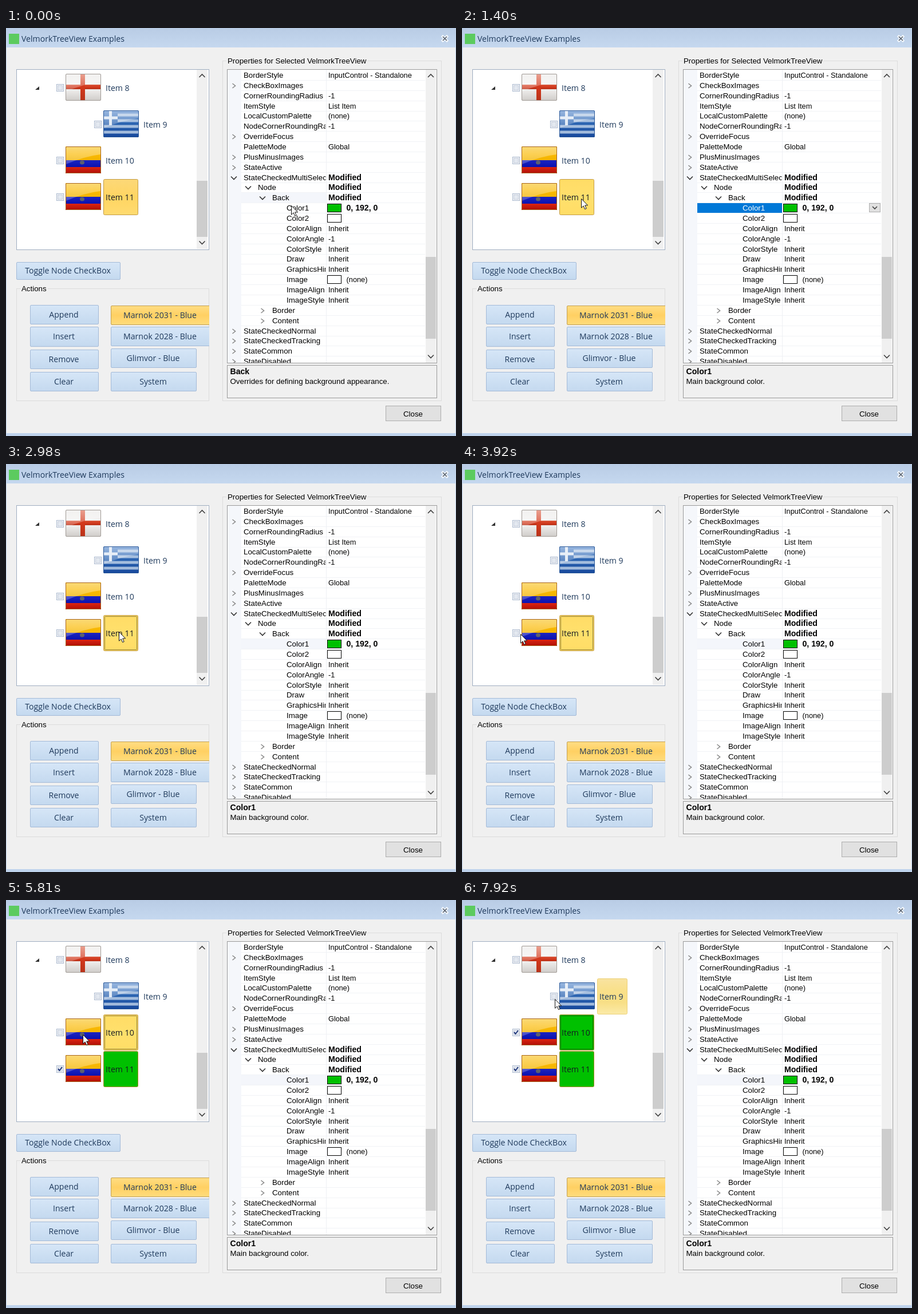
Write an HTML page that moves like this. It is 786x713 px and loops after 7.99 s.

```html
<!DOCTYPE html>
<html lang="en">
<head>
<meta charset="utf-8">
<title>Tree view examples</title>
<style>
html, body { margin: 0; width: 100%; height: 100%; overflow: hidden; background: #f0f0f0; }
svg { display: block; width: 786px; height: 713px; }
text { font-family: "Liberation Sans", Arial, sans-serif; font-size: 13.3px; fill: #000; }
.ui { font-family: "Open Sans", "Noto Sans", sans-serif; font-size: 14.1px; fill: #1e395b; }
.val { font-size: 12.8px; }
.bold { font-size: 14.1px; font-weight: bold; }
</style>
</head>
<body>
<svg id="stage" viewBox="0 0 786 713" xmlns="http://www.w3.org/2000/svg"></svg>
<script>
const LOOP = 7990;
const stage = document.getElementById('stage');

const rect = (x, y, w, h, fill, stroke = 'none', more = '') =>
  `<rect x="${x}" y="${y}" width="${w}" height="${h}" fill="${fill}" stroke="${stroke}" ${more}/>`;
const box = (x, y, w, h, fill, stroke, more) => rect(x + .5, y + .5, w - 1, h - 1, fill, stroke, more);
const text = (x, y, str, more = '') => `<text x="${x}" y="${y}" ${more}>${str}</text>`;
const line = (d, stroke, width = 1, more = '') =>
  `<path d="${d}" fill="none" stroke="${stroke}" stroke-width="${width}" ${more}/>`;
const grad = (id, ...colors) => `<linearGradient id="${id}" x2="0" y2="1">` +
  colors.map((c, i) => `<stop offset="${i / (colors.length - 1)}" stop-color="${c}"/>`).join('') +
  '</linearGradient>';
const clip = (id, x, y, w, h) => `<clipPath id="${id}">${rect(x, y, w, h, '#000')}</clipPath>`;

const chevron = (x, y, dir, color = '#404040', s = 5) => {
  const h = s * .5;
  const d = {
    right: `M${x - h} ${y - s + 1}L${x + h} ${y}L${x - h} ${y + s - 1}`,
    down: `M${x - s} ${y - h}L${x} ${y + h}L${x + s} ${y - h}`,
    up: `M${x - s} ${y + h}L${x} ${y - h}L${x + s} ${y + h}`
  }[dir];
  return line(d, color, 1.6);
};

const defs = `<defs>
  ${grad('bar', '#b9cce5', '#c5d8ef')}
  ${grad('btn', '#d6e6f7', '#c4d9ef')}
  ${grad('gold', '#ffdd83', '#ffd063', '#ffdc7c')}
  ${grad('sel', '#fcd878', '#ffd562', '#ffdb70')}
  ${grad('hot', '#ffdc66', '#ffe06c', '#ffdd66')}
  ${grad('hover', '#f9e3a0', '#f9e08a', '#f8df86', '#fbeaa8')}
  ${grad('cloth', '#e9e7e5', '#f6f5f4', '#cfccc9')}
  ${grad('cross', '#d9583c', '#d3381c', '#b8331a')}
  ${grad('sea', '#4a80c8', '#2a63b0', '#17489c')}
  ${grad('yellow', '#f6bd10', '#fbb900', '#f2b400')}
  ${grad('blue', '#1c24c0', '#0a12b0')}
  ${grad('red', '#dc2412', '#ae0f04')}
  ${grad('gloss', 'rgba(255,255,255,.42)', 'rgba(255,255,255,.2)')}
  ${clip('names', 387, 73, 171.5, 512)}
  ${clip('grid', 387, 73, 346, 512)}
  ${clip('group', 18, 455, 337, 196)}
</defs>`;

function groupBox(x, y, w, h, label, labelW) {
  return box(x, y, w, h, 'none', '#dcdcdc') + rect(x + 7, y - 3, labelW, 8, '#f0f0f0') +
    text(x + 9, y + 5, label);
}

function button(x, y, w, h, label, fill = 'btn', edge = '#a3bad8') {
  return box(x, y, w, h, `url(#${fill})`, edge, 'rx="1.5"') +
    text(x + w / 2 - 1, y + h / 2 + 4.5, label, 'class="ui" text-anchor="middle"');
}

function scrollBar(x, y, w, h, thumbY, thumbH) {
  const mid = x + w / 2;
  return rect(x, y, w, h, '#f0f0f0') + rect(x, thumbY, w, thumbH, '#cdcdcd') +
    chevron(mid, y + 10.5, 'up') + chevron(mid, y + h - 11, 'down');
}

// Flags are drawn in a 62 x 47 cell.
const sheen = '<path d="M1 1H61V14Q34 17 1 31Z" fill="url(#gloss)"/>';
const frame = c => box(0, 0, 62, 47, 'none', c, 'rx="1.5"');
const flags = {
  cross: rect(0, 0, 62, 47, 'url(#cloth)', 'none', 'rx="2"') +
    rect(0, 19, 62, 8, 'url(#cross)') + rect(26, 0, 8, 47, 'url(#cross)') + sheen + frame('#a09a95'),
  stripes: rect(0, 0, 62, 47, 'url(#sea)', 'none', 'rx="2"') +
    [5.5, 15.5, 25.5, 35.5].map((y, i) =>
      rect(i < 2 ? 25 : 1, y, i < 2 ? 36 : 60, 5, '#c3d5ea', 'none', 'opacity=".8"')).join('') +
    rect(1, 10.5, 24, 5, '#dbe6f3') + rect(10, 1, 5, 25, '#dbe6f3') + sheen + frame('#2a5898'),
  bands: rect(0, 0, 62, 25, 'url(#yellow)') + rect(0, 24, 62, 12, 'url(#blue)') +
    rect(0, 36, 62, 11, 'url(#red)') +
    '<ellipse cx="29" cy="28" rx="4" ry="3.5" fill="#5c5f70"/>' + sheen + frame('#a8651c')
};

const items = [
  { n: 8, x: 88, y: 73, w: 52, flag: 'cross' },
  { n: 9, x: 154, y: 137, w: 53, flag: 'stripes' },
  { n: 10, x: 88, y: 200, w: 61, flag: 'bands' },
  { n: 11, x: 88, y: 264, w: 61, flag: 'bands' }
];

const treeItem = ({ n, x, y, w, flag }) =>
  box(x, y + 25, 13, 13, '#fff', '#a7b6cc') + box(x + 2, y + 27, 9, 9, '#e3e8f0', '#c3cbda') +
  `<path id="tick${n}" d="M${x + 3} ${y + 31}L${x + 5.5} ${y + 34}L${x + 10} ${y + 28}" fill="none" stroke="#22397c" stroke-width="2"/>` +
  `<g transform="translate(${x + 16} ${y + 7})">${flags[flag]}</g>` +
  box(x + 82, y, w, 63, 'none', 'none', `id="back${n}" rx="2"`) +
  box(x + 84, y + 2, w - 4, 59, 'none', '#2a2400',
    `id="focus${n}" stroke-dasharray="1 1" stroke-dashoffset=".5"`) +
  text(x + 86, y + 36.5, 'Item ' + n, `id="label${n}" class="ui"`);

// Property rows: name, value, depth, expander, swatch
const rows = [
  ['BorderStyle', 'InputControl - Standalone'],
  ['CheckBoxImages', '', 0, 'right'],
  ['CornerRoundingRadius', '-1'],
  ['ItemStyle', 'List Item'],
  ['LocalCustomPalette', '(none)'],
  ['NodeCornerRoundingRadius', '-1'],
  ['OverrideFocus', '', 0, 'right'],
  ['PaletteMode', 'Global'],
  ['PlusMinusImages', '', 0, 'right'],
  ['StateActive', '', 0, 'right'],
  ['StateCheckedMultiSelect', 'Modified', 0, 'down'],
  ['Node', 'Modified', 1, 'down'],
  ['Back', 'Modified', 2, 'down'],
  ['Color1', '0, 192, 0', 3, '', '#00c000'],
  ['Color2', '', 3, '', '#fff'],
  ['ColorAlign', 'Inherit', 3],
  ['ColorAngle', '-1', 3],
  ['ColorStyle', 'Inherit', 3],
  ['Draw', 'Inherit', 3],
  ['GraphicsHint', 'Inherit', 3],
  ['Image', '(none)', 3, '', '#fff'],
  ['ImageAlign', 'Inherit', 3],
  ['ImageStyle', 'Inherit', 3],
  ['Border', '', 2, 'right'],
  ['Content', '', 2, 'right'],
  ['StateCheckedNormal', '', 0, 'right'],
  ['StateCheckedTracking', '', 0, 'right'],
  ['StateCommon', '', 0, 'right'],
  ['StateDisabled', '', 0, 'right']
];
const rowTop = i => Math.round(74 + 17.86 * i);

function propertyRow([name, value, depth = 0, arrow, swatch], i) {
  const y = rowTop(i), base = y + 13;
  const bold = value === 'Modified' || name === 'Color1';
  return line(`M411 ${y + 17.5}H732`, '#f1f3f6') +
    (arrow ? chevron(398 + 25 * depth, y + 9, arrow, arrow === 'down' ? '#333' : '#8a8a8a') : '') +
    `<g clip-path="url(#names)">${text(415 + 25 * depth, base, name, `id="name${i}"`)}</g>` +
    (swatch ? box(561, y + 1, 25, 15, swatch, '#000') : '') +
    text(swatch ? 594.5 : 563, base, value, `class="${bold ? 'bold' : 'val'}"`);
}

const propertyGrid = box(386, 72, 367, 514, '#fff', '#9a9a9a') + rect(387, 73, 24, 512, '#f5f7fb') +
  `<g clip-path="url(#grid)">${rect(411, 0, 148, 17, '#f4f6fb', 'none', 'id="mark"')}
   ${rows.map(propertyRow).join('')}
   ${line('M559.5 73V585', '#eef0f4')}</g>` +
  scrollBar(733, 73, 18, 512, 400, 143) +
  `<g id="drop">${box(711, 306, 20, 16, '#e1e1e1', '#adadad')}${chevron(721, 314, 'down', '#444', 4)}</g>` +
  box(386, 589, 367, 58, '#f0f0f0', '#9a9a9a') +
  text(391.5, 605, '', 'id="helpName" class="bold"') + text(391.5, 622, '', 'id="help"');

stage.innerHTML = defs +
  rect(0, 0, 786, 713, '#f0f0f0') +
  rect(0, 0, 786, 34, 'url(#bar)') + rect(0, 708, 786, 5, '#bfd3ec') +
  rect(0, 34, 1, 679, '#c3d5ec') + rect(785, 34, 1, 679, '#c3d5ec') +
  rect(5, 10, 18, 18, '#5ccb5f') +
  text(27, 23.5, 'VelmorkTreeView Examples', 'class="ui"') +
  line('M763 15L770 22M770 15L763 22', '#f4f8fc', 4.5, 'stroke-linecap="square"') +
  line('M763 15L770 22M770 15L763 22', '#596270', 1.7) +
  box(18, 72, 337, 316, '#fff', '#9fadc0') + scrollBar(333, 73, 19, 313, 267, 98) +
  '<path d="M58 102V108H51Z" fill="#303030"/>' + items.map(treeItem).join('') +
  button(18, 409, 182, 31, 'Toggle Node CheckBox') +
  groupBox(18, 455, 337, 197, 'Actions', 48) +
  button(42, 484, 120, 34, 'Append') + button(42, 522, 120, 35, 'Insert') +
  button(42, 562, 120, 34, 'Remove') + button(42, 601, 120, 34, 'Clear') +
  `<g clip-path="url(#group)">${button(183, 485, 174, 34, 'Marnok 2031 - Blue', 'gold', '#c2a052')}
   ${button(183, 522, 174, 34, 'Marnok 2028 - Blue')}</g>` +
  button(183, 560, 150, 34, 'Glimvor - Blue') + button(183, 601, 150, 34, 'System') +
  groupBox(378, 57, 383, 595, 'Properties for Selected VelmorkTreeView', 246) + propertyGrid +
  box(663, 660, 97, 27, '#e1e1e1', '#adadad') + text(711, 678.5, 'Close', 'text-anchor="middle"') +
  `<path id="cursor" d="M.5 .5V16.2L4.1 12.8L6.6 18.6L9.2 17.5L6.7 11.9H11.6Z" fill="#fff" stroke="#111"/>`;

// Pointer moves: start, end, number of steps, points passed
const moves = [
  [70, 830, 11, [498, 310], [499, 311], [540, 312], [600, 312]],
  [900, 1130, 4, [600, 312], [182, 291]],
  [1330, 1400, 2, [182, 291], [208, 298]],
  [1540, 2090, 9, [208, 298], [206, 297], [184, 270], [168, 246], [180, 240]],
  [2490, 2710, 4, [180, 240], [198, 292]],
  [2910, 3320, 7, [198, 292], [196, 293], [105, 298]],
  [3520, 3520, 1, [105, 298], [102, 298]],
  [3920, 3920, 1, [102, 298], [102, 297]],
  [4120, 4850, 9, [102, 297], [97, 296], [98, 295], [150, 270], [199, 239]],
  [4920, 5050, 2, [199, 239], [208, 236]],
  [5600, 6360, 11, [208, 236], [140, 235], [76, 232], [88, 233], [100, 234]],
  [6630, 6630, 1, [100, 234], [98, 232]],
  [6960, 7720, 10, [98, 232], [95, 231], [110, 215], [150, 190], [164, 175]],
  [7790, 7920, 2, [164, 175], [162, 173]]
];

function pointer(t) {
  let m = moves[0];
  for (const next of moves) if (t >= next[0]) m = next;
  const [start, end, steps, ...pts] = m;
  if (t < start) return pts[0];
  const done = t >= end ? steps : 1 + Math.floor((t - start) / (end - start) * (steps - 1));
  const at = done / steps * (pts.length - 1);
  const i = Math.min(Math.floor(at), pts.length - 2);
  return pts[i].map((v, k) => Math.round(v + (pts[i + 1][k] - v) * (at - i)));
}

const CLICK = { row: 140, tree: 1540, ten: 2020, eleven: 2910, tick11: 4190, tenAgain: 5330, tick10: 7030 };
const set = (id, attrs) => {
  const el = document.getElementById(id);
  for (const k in attrs) el.setAttribute(k, attrs[k]);
};
const show = (id, on) => set(id, { visibility: on ? 'visible' : 'hidden' });

function draw(t) {
  const [px, py] = pointer(t);
  set('cursor', { transform: `translate(${px} ${py})` });

  const selected = t < CLICK.ten ? 11 : t < CLICK.eleven ? 10 : t < CLICK.tenAgain ? 11 : 10;
  for (const { n, y } of items) {
    const hot = px < 333 && py >= y && py < y + 63.5;
    const checked = n === 11 ? t >= CLICK.tick11 : n === 10 && t >= CLICK.tick10;
    const on = n === selected;
    const [fill, stroke] = checked ? ['#00c000', '#b08a2a']
      : on ? [hot ? 'url(#hot)' : 'url(#sel)', '#c29b45']
      : hot ? ['url(#hover)', '#ecd078'] : ['none', 'none'];
    set('back' + n, { fill, stroke });
    set('label' + n, { style: on || checked ? 'fill:#141a22' : '' });
    show('tick' + n, checked);
    show('focus' + n, on && t >= CLICK.tree);
  }

  const picked = t >= CLICK.row;
  const active = picked && t < CLICK.tree;
  set('mark', { y: rowTop(picked ? 13 : 12), fill: active ? '#0078d7' : '#f4f6fb' });
  set('name13', { style: active ? 'fill:#fff' : '' });
  show('drop', active);
  document.getElementById('helpName').textContent = picked ? 'Color1' : 'Back';
  document.getElementById('help').textContent =
    picked ? 'Main background color.' : 'Overrides for defining background appearance.';
}

const begin = performance.now();
function tick() {
  draw((performance.now() - begin) % LOOP);
  requestAnimationFrame(tick);
}
tick();
</script>
</body>
</html>
```
